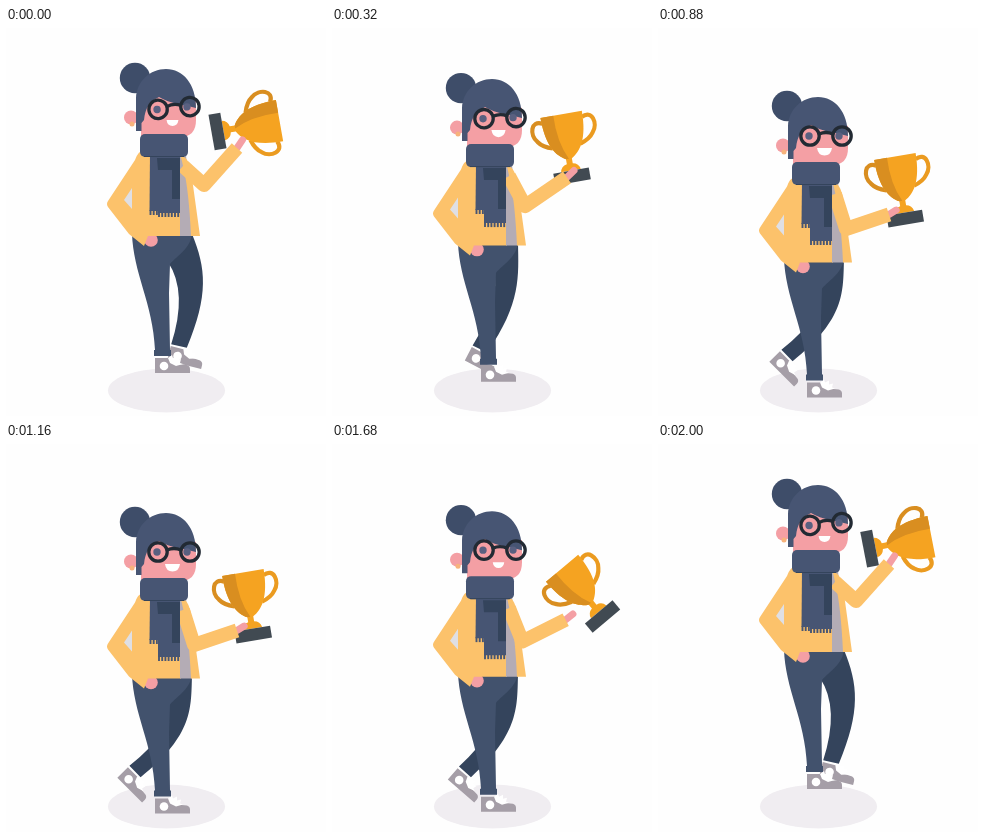
These frames come from a looping animation (320 px wide and 388 px high, 2040 ms). An HTML page with a canvas:

```html
<!DOCTYPE html>
<html lang="en">
<head>
<meta charset="utf-8">
<title>Trophy toss</title>
<style>
html, body { margin: 0; width: 100%; height: 100%; overflow: hidden; background: #fefefe; }
canvas { display: block; }
</style>
</head>
<body>
<canvas width="320" height="388"></canvas>
<script>
const ctx = document.querySelector('canvas').getContext('2d');
const LOOP = 2040, STEP = 40;
const C = {
  navy: '#475573', bun: '#3e4d69', jeans: '#42526d', dark: '#34445c', skin: '#f49fa4', coat: '#fcc26b',
  shirt: '#b4acb5', shoe: '#a59ea7', gold: '#f5a321', bronze: '#d98e20', frame: '#222a33'
};

const lerp = (a, b, p) => a + (b - a) * p;
const mix = (a, b, p) => a.map((v, i) => lerp(v, b[i], p));
const bow = p => Math.sin(Math.PI * p);
function smooth(t, from, to) {
  const x = Math.min(1, Math.max(0, (t - from) / (to - from)));
  return x * x * (3 - 2 * x);
}
// 1 = down at rest, 0 = top of the hop
const cycle = (t, a, b, c, d) => smooth(t, a, b) - smooth(t, c, d);

// Smooth curve through rows of [time, ...values]
function curve(rows, t) {
  const n = rows.length - 1;
  let i = 0;
  while (i < n - 1 && t >= rows[i + 1][0]) i++;
  const slope = (k, j) => k === 0 || k === n ? 0
    : (rows[k + 1][j] - rows[k - 1][j]) / (rows[k + 1][0] - rows[k - 1][0]);
  const [a, b] = [rows[i], rows[i + 1]];
  const h = b[0] - a[0], x = Math.min(1, (t - a[0]) / h);
  return a.slice(1).map((v, k) => {
    const j = k + 1;
    return v + (b[j] - v) * x * x * (3 - 2 * x)
      + h * x * (1 - x) * ((1 - x) * slope(i, j) - x * slope(i + 1, j));
  });
}

function fill(d, color) {
  ctx.fillStyle = color;
  ctx.fill(new Path2D(d));
}
function line(d, color, width, cap = 'butt') {
  ctx.strokeStyle = color;
  ctx.lineWidth = width;
  ctx.lineCap = cap;
  ctx.lineJoin = 'round';
  ctx.stroke(new Path2D(d));
}
function oval(x, y, rx, ry, color) {
  ctx.fillStyle = color;
  ctx.beginPath();
  ctx.ellipse(x, y, rx, ry, 0, 0, 7);
  ctx.fill();
}
const dot = (x, y, r, color) => oval(x, y, r, r, color);
function at(x, y, degrees, draw) {
  ctx.save();
  ctx.translate(x, y);
  ctx.rotate(degrees * Math.PI / 180);
  draw();
  ctx.restore();
}

function shoe() {
  fill('M-8 2H6L13 8L24 9Q27 10 27 13V17H-8Z', C.shoe);
  fill('M5 2L9 -1L10 2L14 0L14 4L18 3L17 7L20 8L13 10L7 7Z', '#fff');
  dot(1, 10, 4.3, '#fff');
}

function trophy() {
  line('M-20 -57C-31 -63 -35 -48 -28 -40Q-24 -34 -14 -31', C.bronze, 4.2);
  line('M20 -57C31 -63 35 -48 28 -40Q24 -34 14 -31', '#eb9b20', 4.2);
  const left = 'L-3 -18C-12 -23 -21 -34 -21 -63Z';
  fill('M-21 -63H21C21 -34 12 -23 3 -18V-13Q9 -12 10 -6H-10Q-9 -12 -3 -13V-18' + left, C.gold);
  fill('M-21 -63H-8Q-9 -36 0 -18' + left, C.bronze);
  fill('M-18 -6H18V6H-18Z', '#414a52');
}

function legs(p) {
  const [kx, ky] = mix([185 - 4 * bow(p), 264], [170 - 4 * bow(p), 263], p);
  const ax = lerp(173, 129, p) + 5 * bow(p), ay = lerp(318, 303, p) + 5 * bow(p);
  const len = Math.hypot(ax - kx, ay - ky) / 8;
  const nx = (ay - ky) / len, ny = (kx - ax) / len;
  at(ax, ay, lerp(14, 45, p * p), shoe);
  fill(`M186 206C${kx + 15} ${ky - 24} ${kx + 18} ${ky + 3} ${ax + nx} ${ay + ny}
    L${ax - nx} ${ay - ny}Q${kx - 3} ${ky} 162 234L150 206Z`, C.dark);
  at(157, 328, 0, shoe);
  fill('M126 205H186C185 220 172 227 164 236L163 265L164 322H165V328H148V322H149C147 275 127 245 126 205Z', C.jeans);
}

function coat() {
  fill('M126 158L117 172L128 184Z', '#dfdfe4');
  dot(145, 212, 6.8, C.skin);
  fill('M138 122Q132 123 129 132L102 173Q100 176 102 179L123 206L138 218L142 208H175L178 128L144 122ZM126 160L126 181L118 172Z', C.coat);
  fill('M174 126H180L186 208H174Z', C.shirt);
  fill('M175 129Q183 127 186 150L194 208H185Q183 165 178 142Z', C.coat);
}

function arm(q) {
  const ex = lerp(198, 188, q), ey = lerp(157, 173, q) + 3 * bow(q);
  const wx = 231 + 4 * bow(q), wy = lerp(120, 158.5, q);
  const dx = (wx - ex) / 48, dy = (wy - ey) / 48;
  line(`M${wx} ${wy}L${wx + dx * 8} ${wy + dy * 8 - 2}`, C.skin, 7, 'round');
  line(`M177 138L${ex} ${ey}L${wx} ${wy}`, C.coat, 14);
}

function fringe(x1, x2, y) {
  for (let x = x1; x < x2; x += 3.2) line(`M${x + 1} ${y - 1}v5`, C.navy, 1.9);
}

function scarf(swing) {
  const end = 168 + 15 * swing;
  fill(`M144 126H155V${end}H143.5Z`, C.navy);
  fringe(143.5, 153, end);
  fill('M152 126H174V185H152Z', C.navy);
  fringe(152, 174, 185);
  fill('M151 130H174V171H166V142H152Z', C.dark);
  ctx.fillStyle = C.navy;
  ctx.beginPath();
  ctx.roundRect(134, 106, 48, 23, 5);
  ctx.fill();
  line('M138 128.5H178', C.dark, 1);
}

function head(tilt, smile) {
  dot(129, 50, 15.2, C.bun);
  dot(125, 89.5, 7, C.skin);
  dot(126, 96, 2.5, '#f7b37c');
  fill('M135 70Q160 52 190 70V92Q190 109 174 109H135Z', C.skin);
  fill('M130 103V70C131 53 144 41 160 41C177 41 190 56 190 80C180 77 164 76 153 69C144 73 139 80 138 92L135.5 95V103Z', C.navy);
  at(168, 80, tilt, () => {
    for (const [x, gaze] of [[-16, -1], [16, -3]]) {
      dot(x + gaze, 0, 3.7, '#596080');
      ctx.strokeStyle = C.frame;
      ctx.lineWidth = 3.3;
      ctx.beginPath();
      ctx.arc(x, 0, 9.2, 0, 7);
      ctx.stroke();
    }
    line('M-7 -2Q0 -5 7 -2', C.frame, 3.3);
  });
  ctx.save();
  ctx.translate(166.5, 92);
  ctx.scale(smile, smile);
  fill('M-7 0H7Q6 7 0 7T-7 0Z', '#fff');
  ctx.restore();
}

// time, centre x, centre y, angle
const flight = [
  [0, 243, 98, 80], [160, 239, 103, 32], [320, 234.5, 117, -10],
  [600, 242, 159, -9.5], [640, 242, 159, -9.5], [1560, 242, 159, -9.5],
  [1600, 242, 159, -9.5], [1680, 250, 148, -40], [1800, 272, 117.5, -130],
  [1900, 262, 99, -213], [2000, 243, 98.5, -281]
];
const smiles = [[0, .85], [240, 1], [1600, 1], [1800, .5], [2000, .85]];

function draw(t) {
  const drop = cycle(t, 60, 700, 1620, 2000);
  const stride = cycle(t, 0, 520, 1620, 2000);
  const reach = cycle(t, 40, 600, 1580, 1900);
  const [x, y, angle] = curve(flight, t);
  const up = 1 - drop;

  ctx.fillStyle = '#fefefe';
  ctx.fillRect(0, 0, 320, 388);
  oval(160.5, 362.5, 58.5, 22, '#f0edf1');
  at(0, 24.5 * drop, 0, () => legs(stride));
  at(0, 26.5 * drop, 0, coat);
  at(x, y, angle, () => {
    ctx.translate(0, 32);
    trophy();
  });
  at(0, 28 * drop, 0, () => {
    arm(reach);
    head(-5 * up * up, curve(smiles, t)[0]);
    scarf(up ** 3);
  });
}

function tick() {
  const t = performance.now() % LOOP;
  draw(Math.floor(t / STEP) * STEP);
  requestAnimationFrame(tick);
}
tick();
</script>
</body>
</html>
```
